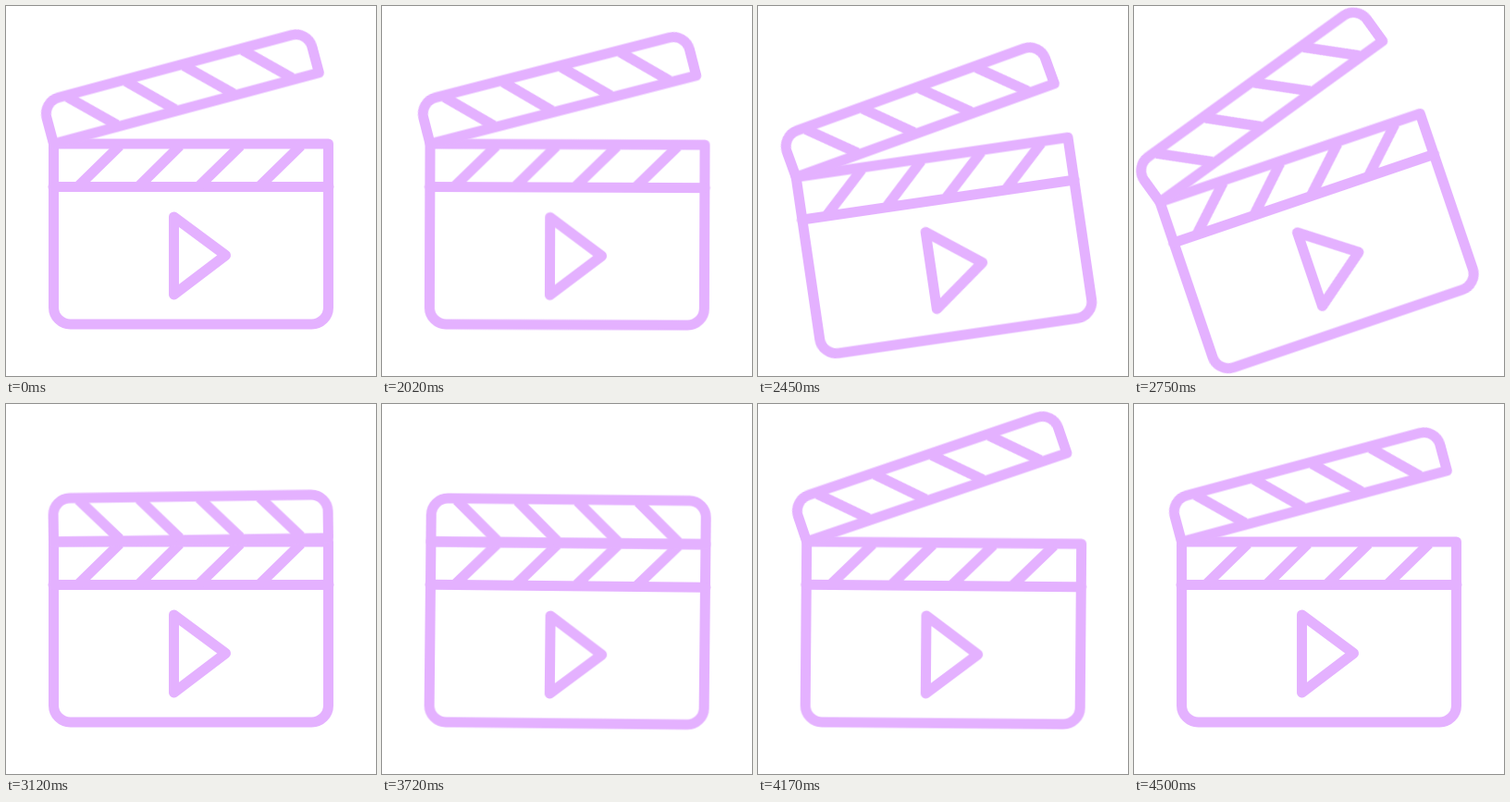
Animation of 400x400 px, one loop 4520 ms. Source, as an HTML page without scripts:

```html
<!DOCTYPE html>
<html lang="en">
<head>
<meta charset="utf-8">
<title>Clapperboard</title>
<style>
  html, body { margin: 0; height: 100%; overflow: hidden; background: #fff; }
  svg { display: block; width: 100vw; height: 100vh; }
  .ink { fill: none; stroke: #e4b1ff; stroke-width: 11; stroke-linejoin: round; }
  .board, .stick { animation: 4520ms ease-in-out infinite; }
  .board { transform-origin: 200px 246.5px; animation-name: swing; }
  .stick { transform-origin: 51.5px 149px; animation-name: clap; }

  /* tip right, wind up left, slam level; later a gentle nod */
  @keyframes swing {
    0%, 44.03%, 67.92%, 81.13%, 93.36%, 100% { transform: translate(0, 0) rotate(0deg); }
    49.34% { transform: translate(5px, 17.5px) rotate(6.7deg); }
    58.41%, 59.51% { transform: translate(0, 10.5px) rotate(-19.8deg); }
    87.28% { transform: translate(5.6px, 16.2px) rotate(7.6deg); }
  }

  /* half close, open wide, shut with one bounce, reopen past rest */
  @keyframes clap {
    0%, 44.03%, 99.56%, 100% { transform: rotate(-15deg); }
    49.34% { transform: rotate(-3.2deg); }
    58.41%, 59.51% { transform: rotate(-18deg); }
    68.03%, 74.67%, 88.16% { transform: rotate(0deg); }
    71.35% { transform: rotate(-4deg); }
    92.92% { transform: rotate(-20deg); }
  }
</style>
</head>
<body>
<svg viewBox="0 0 400 400">
  <g class="ink board">
    <path d="M51.5 149H348.5V326a18 18 0 0 1-18 18H69.5a18 18 0 0 1-18-18Z"/>
    <path d="M51 195.5H349" stroke-linecap="round"/>
    <path d="M123 151L79 194M188 151L144.500 194M253.500 151L209.500 194M319 151L275 194"/>
    <path d="M181.500 228L237.500 269.500L181.500 312Z"/>
    <g class="stick">
      <path d="M51.5 149V120a18 18 0 0 1 18-18H330.500a18 18 0 0 1 18 18V149Z"/>
      <path d="M79 104L123 147M144.500 104L188 147M209.500 104L253.500 147M275 104L319 147"/>
    </g>
  </g>
</svg>
</body>
</html>
```
